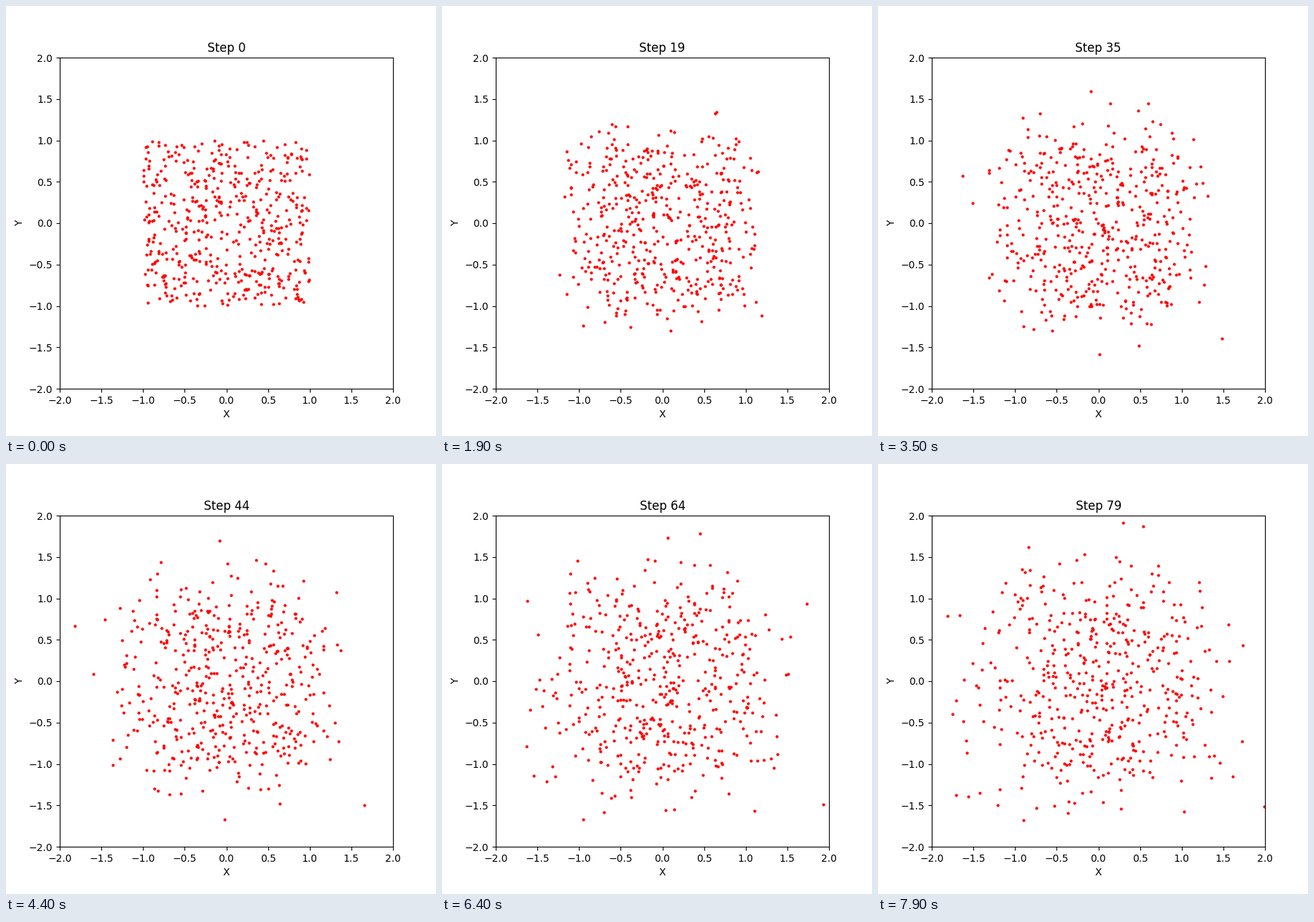
These frames come from a looping animation (600x600 px, 8 s). A matplotlib script:

```python
import numpy as np
import matplotlib.pyplot as plt
from matplotlib.animation import FuncAnimation

COUNT = 500
STEPS = 80
DAMPING = 0.9
KICK = 0.0057


def simulate(seed=7):
    """Brownian particles starting at rest in a square; returns (step, particle, xy)."""
    rng = np.random.default_rng(seed)
    pos = rng.uniform(-1, 1, (COUNT, 2))
    vel = np.zeros_like(pos)
    path = [pos]
    for _ in range(STEPS - 1):
        vel = DAMPING * vel + KICK * rng.standard_normal(pos.shape)
        pos = pos + vel
        path.append(pos)
    return np.array(path)


path = simulate()

fig, ax = plt.subplots(figsize=(6, 6), dpi=100)
dots, = ax.plot([], [], "ro", markersize=2)
ax.set_xlim(-2, 2)
ax.set_ylim(-2, 2)
ax.set_xlabel("X")
ax.set_ylabel("Y")
title = ax.set_title("Step 0")


def update(step):
    dots.set_data(path[step, :, 0], path[step, :, 1])
    title.set_text(f"Step {step}")
    return dots, title


anim = FuncAnimation(fig, update, frames=STEPS, interval=100,
                     repeat=True, repeat_delay=0, blit=False)
plt.show()
```
